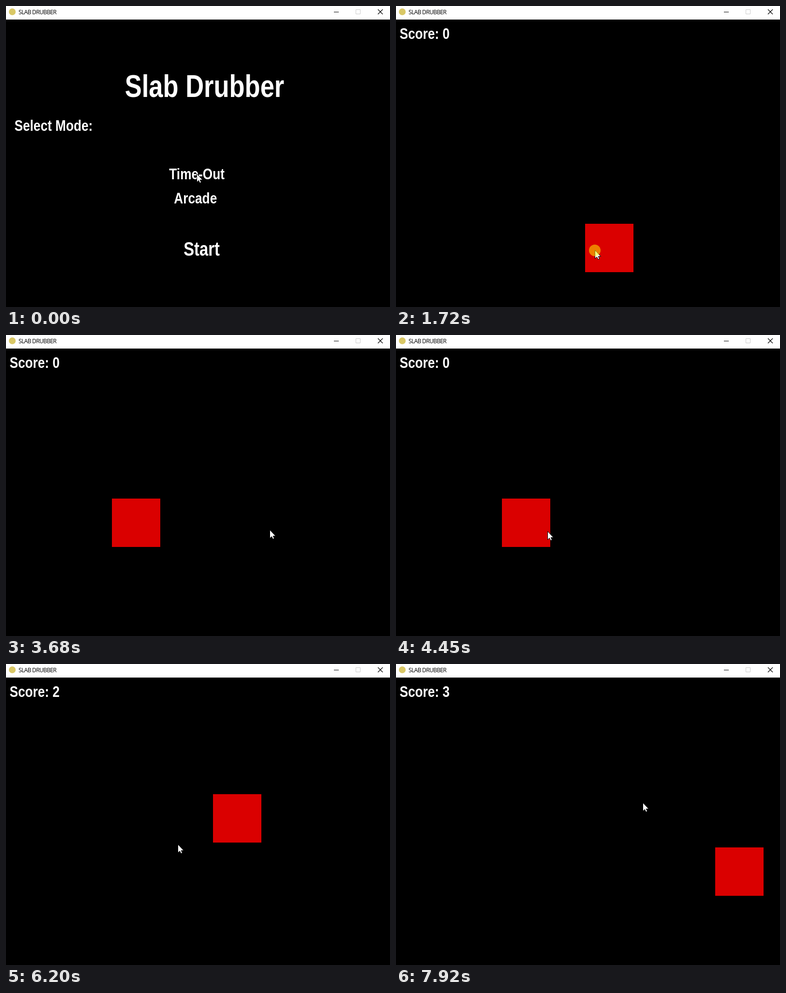
An HTML page that plays this animation: 794 by 622 pixels, repeating every 8 s.

```html
<!DOCTYPE html>
<html lang="en">
<head>
<meta charset="utf-8">
<title>Slab Drubber</title>
<style>
  html, body { margin: 0; width: 100%; height: 100%; overflow: hidden; background: #000; }
  svg { display: block; width: 794px; height: 622px; }
  .game text { font: bold 32px "Liberation Sans", Arial, sans-serif; fill: #fff; white-space: pre; }
  .game .title { font-size: 64px; text-anchor: middle; }
  .game .start { font-size: 40px; }
  .caption { font: 12px "Open Sans", sans-serif; letter-spacing: -.65px; fill: #000; }
</style>
</head>
<body>
<svg viewBox="0 0 794 622">
  <rect width="794" height="622"/>
  <g class="bar">
    <rect width="794" height="28" fill="#fff"/>
    <circle cx="13" cy="12" r="7" fill="#d9c766"/>
    <text class="caption" x="26" y="17">SLAB DRUBBER</text>
    <g fill="none" stroke="#000">
      <path d="M678 12.5h10"/>
      <path d="M723.5 7.5h9v9h-9z" stroke="#ccc"/>
      <path d="M769 7l10 10M779 7l-10 10" stroke-width="1.2"/>
    </g>
  </g>
  <!-- condensed lettering: one narrow factor for all game text -->
  <g class="game">
    <g id="menu">
      <text class="title" transform="translate(410.5 188) scale(.82 1)">Slab Drubber</text>
      <text transform="translate(17.5 258) scale(.82 1)">Select Mode:</text>
      <text transform="translate(337.3 358) scale(.82 1)">Time-Out</text>
      <text transform="translate(347.3 408) scale(.82 1)">Arcade</text>
      <text class="start" transform="translate(367.2 516) scale(.82 1)">Start</text>
      <rect id="choice" x="327" y="318" width="135" height="57" fill="none" stroke="#fff" stroke-width="2"/>
    </g>
    <g id="play">
      <text id="score" transform="translate(7.4 68) scale(.82 1)"></text>
      <rect id="tile" width="100" height="100" fill="#da0000"/>
    </g>
  </g>
  <g id="pointer">
    <path d="M.5 -.2V17L4.4 13.5 6.8 18.7 9.6 17.5 7.3 12.4H12.6Z" fill="#fff" stroke="#000"/>
    <circle id="click" r="12" fill="#ff0" fill-opacity=".5"/>
  </g>
</svg>
<script>
const LOOP = 8000, GAME_START = 1720;
const [menu, choice, play, score, tile, pointer, click] =
  ["menu", "choice", "play", "score", "tile", "pointer", "click"].map(id => document.getElementById(id));

const linear = p => p;
const easeIn = p => p ** 1.4;
const easeOut = p => 1 - (1 - p) ** 1.8;
const smooth = p => p * p * (3 - 2 * p);

// first step, last step, step count, end x, end y, easing
const moves = [
  [460, 550, 2, 411, 505, linear],
  [2590, 2750, 3, 544, 248, smooth],
  [3060, 3760, 10, 545, 421, smooth],
  [4150, 4450, 5, 313, 406, smooth],
  [5170, 5480, 5, 110, 543, smooth],
  [5960, 6200, 4, 355, 373, easeIn],
  [6280, 6600, 5, 468, 351, easeOut],
  [7060, 7460, 6, 584, 166, smooth],
  [7770, 7920, 3, 510, 287, smooth]
];
// time, x, y
const tiles = [
  [GAME_START, 391, 450], [2670, 504, 399], [3680, 219, 338], [4640, 61, 494],
  [5560, 428, 269], [6520, 532, 108], [7540, 660, 379]
];
const hits = [4640, 5560, 7540];
const clicks = [[150, 310], [GAME_START, 1810], [3910, 4000], [4640, 4700], [5560, 5700], [6750, 6830], [7540, 7610]];

function pointerAt(t) {
  let x = 394, y = 347;
  for (const [first, last, count, toX, toY, ease] of moves) {
    if (t < first) break;
    const step = Math.floor((t - first) / (last - first) * (count - 1) + 1e-6) + 1;
    const p = ease(Math.min(1, step / count));
    x += (toX - x) * p;
    y += (toY - y) * p;
  }
  return [Math.round(x), Math.round(y)];
}

const show = (el, on) => el.setAttribute("display", on ? "inline" : "none");

function draw(t) {
  const playing = t >= GAME_START;
  show(menu, !playing);
  show(choice, !playing && t >= 150);
  show(play, playing);
  if (playing) {
    const [, x, y] = tiles.filter(([at]) => at <= t).pop();
    tile.setAttribute("x", x);
    tile.setAttribute("y", y);
    score.textContent = "Score: " + hits.filter(at => at <= t).length;
  }
  pointer.setAttribute("transform", `translate(${pointerAt(t)})`);
  show(click, clicks.some(([from, to]) => t >= from && t < to));
}

const began = performance.now();
function tick() {
  draw((performance.now() - began) % LOOP);
  requestAnimationFrame(tick);
}
tick();
</script>
</body>
</html>
```
